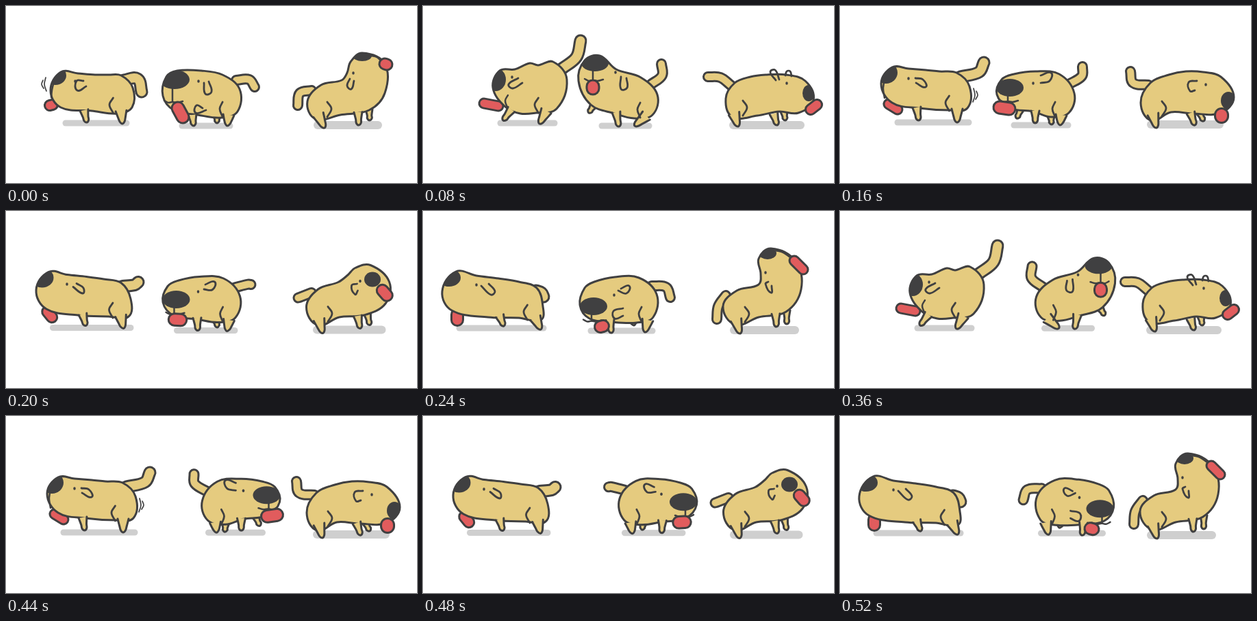
Recreate the animation shown at these times as an HTML page with a canvas. Size 600 by 260 pixels, loop 0.56 s.

```html
<!DOCTYPE html>
<html lang="en">
<head>
<meta charset="utf-8">
<title>Three dogs</title>
<style>
html, body { margin: 0; width: 100%; height: 100%; overflow: hidden; background: #fff; }
canvas { display: block; width: 600px; height: 260px; }
</style>
</head>
<body>
<canvas id="stage"></canvas>
<script>
const STEP = 40, CYCLE = 7, STEPS = 14;
const INK = '#404041', FUR = '#e5cb7f', RED = '#e15c5d', GREY = '#cfcfcf';

// haunch: reach of the thigh line in front of the hind leg
const left = { poses: [], tailWidth: 16, shade: 9, haunch: 17 };
const middle = { poses: [], tailWidth: 13, shade: 9, haunch: 13, muzzle: true };
const right = { poses: [], tailWidth: 13, shade: 12, haunch: -19, tongueOut: true };

// shadow: x1 x2 y; nose: centre and radii; limbs: root and foot;
// tongue: two ends and width; everything else: points on a curve
left.poses.push({
  shadow: [87, 176, 172],
  tail: [172, 109, 192, 107, 198, 126],
  body: [80, 97, 105, 99, 130, 101, 150, 101, 168, 102, 185, 120, 184, 149, 164, 158, 125, 154, 80, 149, 65, 124],
  front: [114, 153, 118, 171], hind: [168, 154, 170, 173],
  nose: [72, 102, 16, 14], mouth: [69, 115, 67, 124, 66, 134],
  tongue: [64, 146, 68, 145, 15],
  ear: [113, 110, 103, 110, 104, 124, 117, 118], eye: [101, 110],
  swish: [57, 115, -1]
});
left.poses.push({
  shadow: [113, 192, 172],
  tail: [203, 92, 224, 75, 230, 51],
  body: [112, 95, 134, 93, 156, 84, 168, 87, 190, 82, 210, 108, 195, 151, 165, 157, 142, 158, 120, 148, 102, 120],
  front: [129, 152, 117, 168], hind: [180, 154, 170, 173],
  nose: [106, 108, 15, 17], mouth: [124, 131, 120, 139, 123, 149],
  tongue: [89, 143, 110, 147, 14],
  ear: [139, 106, 125, 115, 131, 121, 145, 113], eye: [130, 104]
});
left.poses.push({
  shadow: [84, 188, 171],
  tail: [176, 104, 203, 97, 210, 83],
  body: [76, 90, 100, 92, 125, 94, 145, 96, 170, 98, 189, 118, 186, 150, 160, 153, 115, 150, 76, 142, 60, 114],
  front: [112, 149, 115, 168], hind: [171, 151, 171, 171],
  nose: [67, 98, 17, 16], mouth: [64, 113, 63, 122, 65, 135],
  tongue: [71, 144, 84, 152, 14],
  ear: [110, 106, 121, 108, 125, 119, 111, 113], eye: [100, 106],
  swish: [196, 131, 1]
});
left.poses.push({
  shadow: [53, 176, 172],
  tail: [165, 117, 173, 120, 176, 126],
  body: [48, 89, 78, 95, 110, 99, 140, 104, 166, 113, 175, 140, 172, 160, 140, 157, 95, 156, 42, 146, 28, 118],
  front: [112, 154, 118, 169], hind: [164, 157, 172, 174],
  nose: [38, 98, 17, 13],
  tongue: [50, 152, 50, 160, 17],
  ear: [96, 107, 105, 118, 99, 123, 85, 110], eye: [78, 108]
});

middle.poses.push({
  shadow: [257, 327, 176],
  tail: [336, 109, 355, 108, 363, 119],
  body: [250, 95, 285, 95, 316, 101, 341, 122, 338, 155, 315, 164, 280, 160, 245, 153, 229, 132, 234, 104],
  farHind: [308, 162, 308, 172],
  front: [272, 160, 274, 176], hind: [325, 160, 323, 176],
  arm: [287, 150, 278, 146, 277, 157, 292, 153],
  nose: [246, 108, 22, 14],
  tongue: [251, 150, 258, 163, 18],
  ear: [289, 113, 291, 129, 300, 126, 296, 111], eye: [281, 110]
});
middle.poses.push({
  shadow: [261, 330, 176],
  tail: [333, 115, 349, 102, 348, 85],
  body: [258, 73, 282, 93, 318, 105, 342, 130, 335, 160, 308, 165, 280, 158, 245, 145, 227, 110, 236, 80],
  farFront: [249, 146, 242, 157],
  front: [282, 156, 286, 177], hind: [326, 161, 309, 176],
  nose: [251, 84, 20, 12],
  tongue: [248, 118, 248, 121, 18],
  ear: [289, 104, 289, 122, 298, 120, 297, 106], eye: [281, 97]
});
middle.poses.push({
  shadow: [254, 333, 175],
  tail: [334, 115, 353, 103, 354, 89],
  body: [254, 100, 285, 96, 320, 100, 342, 128, 334, 157, 308, 163, 282, 155, 248, 150, 229, 130, 236, 108],
  farFront: [264, 151, 258, 165], farHind: [308, 162, 309, 174],
  front: [285, 154, 285, 172], hind: [323, 160, 321, 175],
  nose: [248, 120, 20, 13],
  tongue: [233, 149, 247, 151, 18],
  ear: [293, 113, 306, 110, 308, 98, 293, 102], eye: [282, 113]
});
middle.poses.push({
  shadow: [245, 335, 176],
  tail: [334, 110, 355, 112, 361, 127],
  body: [250, 104, 280, 97, 315, 98, 341, 122, 336, 156, 312, 164, 275, 163, 243, 158, 229, 138, 236, 113],
  farHind: [307, 162, 308, 168],
  front: [273, 160, 275, 179], hind: [328, 160, 324, 178],
  arm: [292, 143, 278, 147, 280, 158, 292, 154],
  nose: [249, 140, 20, 13],
  tongue: [259, 170, 263, 169, 17],
  ear: [285, 117, 297, 121, 301, 110, 289, 114], eye: [279, 123]
});

right.poses.push({
  shadow: [455, 543, 175],
  tail: [446, 124, 429, 128, 426, 146],
  body: [520, 69, 503, 82, 498, 98, 490, 109, 460, 116, 440, 140, 452, 166, 488, 160, 530, 153, 553, 128, 553, 85],
  farFront: [530, 152, 531, 168],
  front: [514, 156, 515, 175], hind: [456, 160, 465, 179],
  nose: [520, 73, 14, 8], mouth: [533, 73, 541, 75, 547, 80],
  tongue: [553, 85, 556, 86, 16],
  ear: [502, 107, 498, 117, 504, 122, 508, 110], eye: [507, 98]
});
right.poses.push({
  shadow: [453, 551, 175],
  tail: [450, 117, 434, 105, 416, 104],
  body: [558, 110, 530, 101, 500, 101, 478, 104, 455, 113, 442, 136, 452, 163, 488, 161, 520, 155, 548, 157, 570, 138],
  farFront: [527, 155, 529, 168],
  front: [512, 158, 517, 175], hind: [454, 158, 460, 177],
  nose: [563, 128, 9, 12],
  tongue: [566, 152, 575, 145, 15],
  ear: [520, 108, 514, 94, 507, 97, 515, 109], eye: [531, 113],
  farEar: [529, 102, 531, 96, 536, 96, 538, 103]
});
right.poses.push({
  shadow: [454, 554, 174],
  tail: [450, 116, 428, 113, 424, 96],
  body: [556, 104, 530, 97, 505, 96, 480, 101, 453, 113, 439, 142, 454, 168, 483, 156, 515, 158, 556, 157, 575, 134],
  farFront: [524, 155, 531, 169],
  front: [512, 157, 518, 175], hind: [457, 159, 462, 179],
  nose: [567, 139, 11, 13],
  tongue: [557, 160, 557, 162, 19],
  ear: [521, 110, 509, 112, 511, 125, 518, 124], eye: [534, 115]
});
right.poses.push({
  shadow: [454, 543, 175],
  tail: [442, 124, 431, 140, 429, 159],
  body: [508, 55, 490, 70, 493, 92, 490, 108, 458, 117, 438, 140, 456, 167, 490, 156, 530, 148, 552, 115, 544, 74],
  farFront: [531, 146, 531, 166],
  front: [515, 151, 516, 170], hind: [457, 160, 463, 180],
  nose: [503, 62, 13, 9], mouth: [515, 58, 526, 61, 536, 68],
  tongue: [542, 73, 555, 86, 14],
  ear: [504, 104, 500, 107, 508, 120, 509, 110], eye: [500, 90]
});

const canvas = document.getElementById('stage');
const ctx = canvas.getContext('2d');
const ratio = window.devicePixelRatio || 1;
canvas.width = 600 * ratio;
canvas.height = 260 * ratio;
ctx.scale(ratio, ratio);
ctx.lineCap = ctx.lineJoin = 'round';

// Smooth path through the points, handles scaled to each chord
function curve(v, closed) {
  const n = v.length / 2, path = new Path2D();
  const at = i => {
    i = closed ? (i + n) % n : Math.min(n - 1, Math.max(0, i));
    return [v[2 * i], v[2 * i + 1]];
  };
  const handle = (p, from, to, size) => {
    const dx = to[0] - from[0], dy = to[1] - from[1];
    const k = size / (Math.hypot(dx, dy) || 1);
    return [p[0] + dx * k, p[1] + dy * k];
  };
  path.moveTo(v[0], v[1]);
  for (let i = 0; i < (closed ? n : n - 1); i++) {
    const [a, b, c, d] = [at(i - 1), at(i), at(i + 1), at(i + 2)];
    const size = Math.hypot(c[0] - b[0], c[1] - b[1]) * 0.35;
    path.bezierCurveTo(...handle(b, a, c, size), ...handle(c, d, b, size), ...c);
  }
  if (closed) path.closePath();
  return path;
}

function line(path, width = 2.8, color = INK) {
  ctx.lineWidth = width;
  ctx.strokeStyle = color;
  ctx.stroke(path);
}

function fill(path, color) {
  ctx.fillStyle = color;
  ctx.fill(path);
}

// Thick outlined stroke for tails and tongues
function tube(points, width, color) {
  const path = curve(points);
  line(path, width + 3);
  line(path, width - 3, color);
}

// Tapered leg, open at the root so that it merges with the body
function limb([x, y, fx, fy], half) {
  const len = Math.hypot(fx - x, fy - y);
  const ux = (fx - x) / len, uy = (fy - y) / len;
  const p = (along, side) => [x + ux * along - uy * side, y + uy * along + ux * side];
  const path = curve([
    ...p(0, half), ...p(len * 0.55, half * 0.65), ...p(len - 3, 3.4), ...p(len, 0),
    ...p(len - 3, -3.4), ...p(len * 0.55, -half * 0.65), ...p(0, -half)]);
  fill(path, FUR);
  line(path, 3);
}

// Two small arcs beside a moving part
function drawSwish([x, y, side]) {
  const arc = (cx, h) => line(curve([cx - side, y - h, cx + side, y, cx - 2 * side, y + h]), 1.7);
  arc(x, 10);
  arc(x + 4 * side, 6);
}

// Line from the nose to the lips above the tongue
function drawMuzzle([nx, ny, , ry], [, ty, , , w]) {
  const x = nx - 3, y = ty - w / 2;
  line(curve([x, ny + ry, x, y]), 2.5);
  line(curve([x - 12, y - 2, x - 6, y + 1, x, y, x + 7, y + 1, x + 15, y - 1]), 2.5);
}

// Even steps are key poses, odd steps lie halfway between two
function poseAt(poses, step) {
  const a = poses[step >> 1], b = poses[(step + 1) >> 1], mix = {};
  for (const part in a)
    if (b[part]) mix[part] = a[part].map((v, i) => (v + b[part][i]) / 2);
  return mix;
}

function drawDog(dog, step) {
  const p = poseAt(dog.poses, step);
  const [x1, x2, y] = p.shadow;
  const lick = () => tube(p.tongue.slice(0, 4), p.tongue[4], RED);
  const inFront = dog.muzzle || dog.tongueOut;

  line(curve([x1, y, x2, y]), dog.shade, GREY);
  tube(p.tail, dog.tailWidth, FUR);
  if (p.farFront) limb(p.farFront, 5);
  if (p.farHind) limb(p.farHind, 5);
  if (!inFront) lick();

  const body = curve(p.body, true);
  fill(body, FUR);
  const nose = new Path2D();
  nose.ellipse(...p.nose, 0, 0, 2 * Math.PI);
  ctx.save();
  ctx.clip(body);
  fill(nose, INK);
  ctx.restore();
  line(body, 3);

  limb(p.front, 6);
  limb(p.hind, 8);
  const [hx, hy] = p.hind, k = dog.haunch;
  line(curve([hx - 0.68 * k, hy - 19, hx - k, hy - 9, hx - 0.68 * k, hy + 3]));

  if (p.arm) line(curve(p.arm));
  if (p.mouth) line(curve(p.mouth), 2.5);
  if (dog.muzzle) drawMuzzle(p.nose, p.tongue);
  if (inFront) lick();
  if (p.farEar) line(curve(p.farEar));
  line(curve(p.ear));
  const [ex, ey] = p.eye;
  line(curve([ex, ey, ex, ey + 1]), 3.4);
  if (p.swish) drawSwish(p.swish);
}

function draw(step) {
  const pose = step % CYCLE;
  ctx.fillStyle = '#fff';
  ctx.fillRect(0, 0, 600, 260);
  drawDog(left, pose);
  ctx.save();
  // The middle dog turns round for the second half
  if (step >= CYCLE) ctx.transform(-1, 0, 0, 1, 628.5, -3.7);
  drawDog(middle, pose);
  ctx.restore();
  drawDog(right, pose);
}

let shown = -1;
function tick() {
  const step = Math.floor((performance.now() + 0.5) / STEP) % STEPS;
  if (step !== shown) draw(shown = step);
  requestAnimationFrame(tick);
}
tick();
</script>
</body>
</html>
```
